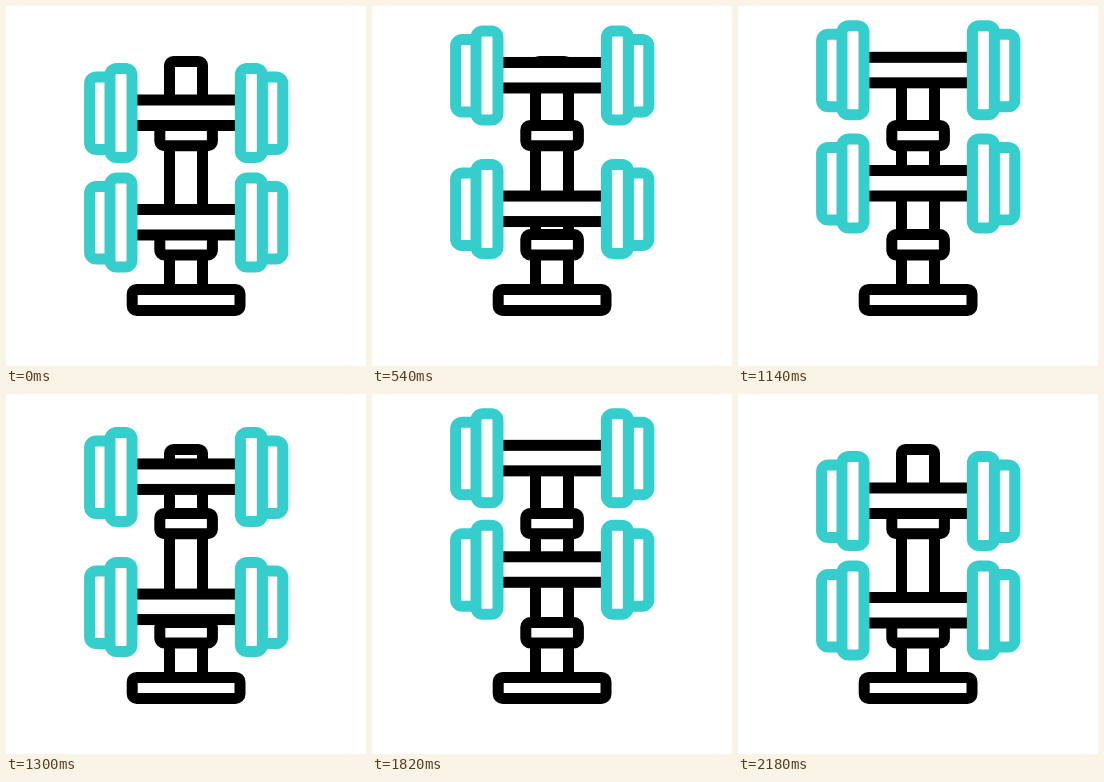
An HTML page that plays this animation: 360 by 360 pixels, repeating every 2.4 s.

```html
<!DOCTYPE html>
<html lang="en">
<head>
<meta charset="utf-8">
<title>Dumbbell rack</title>
<style>
html, body { margin: 0; width: 100%; height: 100%; overflow: hidden; background: #fff; }
svg { display: block; width: 100vw; height: 100vh; }
</style>
</head>
<body>
<svg viewBox="0 0 360 360" fill="#fff" stroke="#000" stroke-width="11">
  <defs>
    <g id="plates" stroke="#36cdcd">
      <rect x="83.6" y="71" width="28" height="72.5" rx="6.5"/>
      <rect x="104" y="62.5" width="22" height="89" rx="6.5"/>
    </g>
    <g id="dumbbell">
      <rect x="115" y="94" width="130" height="25.5"/>
      <use href="#plates"/>
      <use href="#plates" transform="matrix(-1 0 0 1 360.4 0)"/>
    </g>
  </defs>
  <!-- stand -->
  <rect x="163.5" y="55.5" width="33" height="240" rx="4"/>
  <rect x="153.8" y="119.4" width="52.6" height="20.4" rx="4.5"/>
  <rect x="153.8" y="228.6" width="52.6" height="20.4" rx="4.5"/>
  <rect x="126.2" y="283.4" width="107.8" height="21" rx="4.5"/>
  <use id="upper" href="#dumbbell"/>
  <use id="lower" href="#dumbbell" y="109.5"/>
</svg>
<script>
const LOOP = 2400, MOVE = 351, MOVES = 6, LIFT = 42.7;
const parts = [
  { el: document.getElementById('upper'), y: 0, start: 80 },
  { el: document.getElementById('lower'), y: 109.5, start: -9 }
];

// cubic-bezier(2/3, 0, 1/3, 1) in closed form
function ease(x) {
  const d = x - 0.5, root = Math.sqrt(d * d / 16 + 1 / 1728);
  const u = Math.cbrt(d / 4 + root) + Math.cbrt(d / 4 - root);
  return 0.5 + 2 * u - d;
}

// Three lifts: up on even moves, down on odd ones
function lift(t) {
  const n = t / MOVE, i = Math.floor(n);
  if (n < 0 || n >= MOVES) return 0;
  const p = ease(n - i);
  return LIFT * (i % 2 ? 1 - p : p);
}

function draw() {
  const t = performance.now() % LOOP;
  for (const { el, y, start } of parts) el.setAttribute('y', y - lift(t - start));
  requestAnimationFrame(draw);
}
draw();
</script>
</body>
</html>
```
